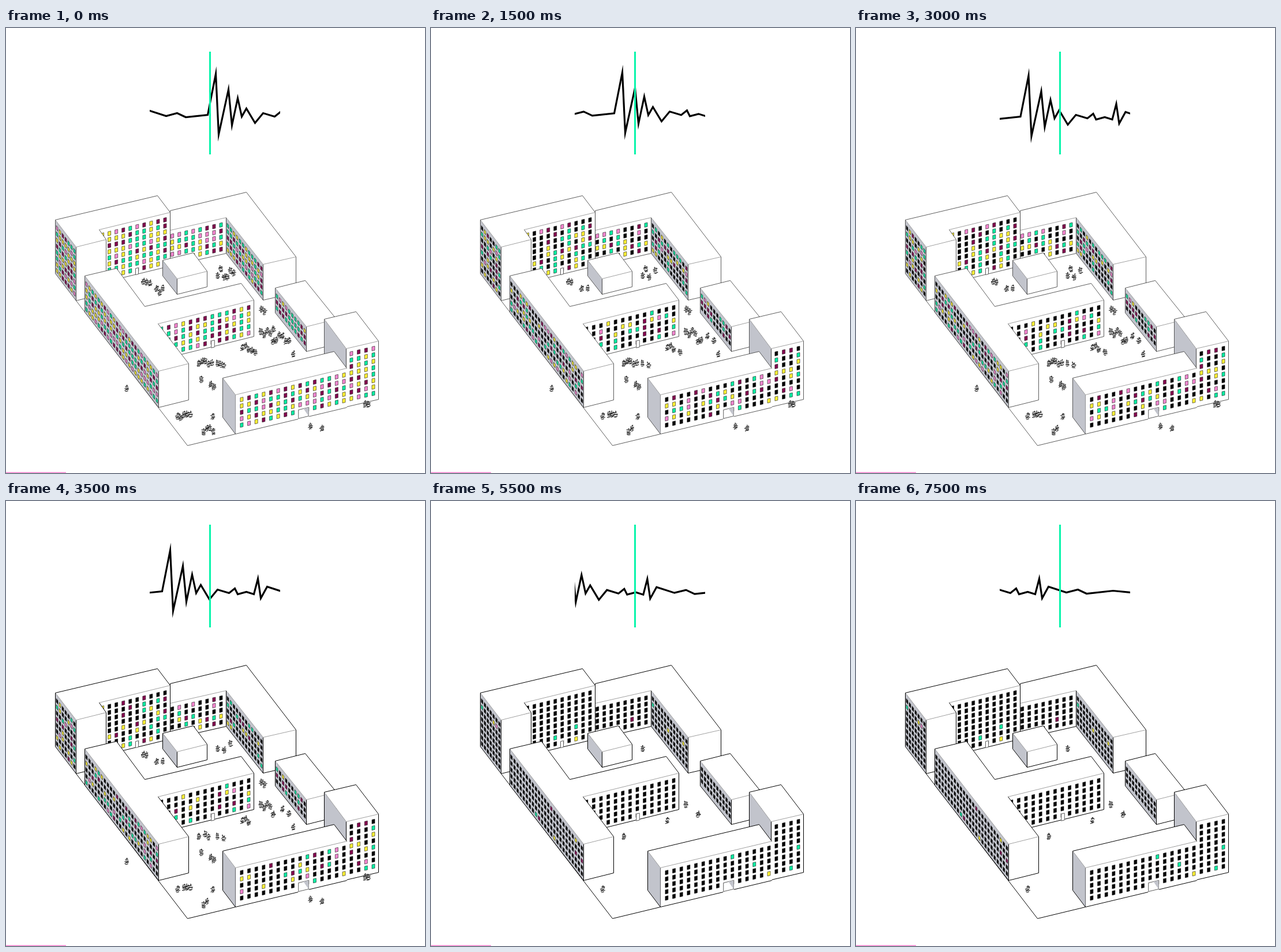
Animation of 726x771 px, one loop 8 s. Source, as an HTML page with a canvas:

```html
<!DOCTYPE html>
<html>
<head>
<meta charset="utf-8">
<style>
html, body { margin: 0; width: 100%; height: 100%; overflow: hidden; background: #fff; }
canvas { display: block; }
</style>
</head>
<body>
<canvas id="stage" width="726" height="771"></canvas>
<script>
const ctx = document.getElementById('stage').getContext('2d');
const STEP = 500, STEPS = 16;
const PHASE_STARTS = [2, 3, 7, 10]; // steps at which windows go dark and people leave
const STAYS = 9;
const SLOPE = -.243;                // fall of the front walls on screen
const WHITE = '#fff', GRAY = '#c2c4cc', GREEN = '#08f0a4', PINK = '#f887d2';

function seeded(seed) {
  return () => {
    seed = (seed + 0x6d2b79f5) | 0;
    let t = Math.imul(seed ^ (seed >>> 15), 1 | seed);
    t = (t + Math.imul(t ^ (t >>> 7), 61 | t)) ^ t;
    return ((t ^ (t >>> 14)) >>> 0) / 4294967296;
  };
}
const rnd = seeded(41);

// First entry whose limit lies above a random number.
const pick = options => {
  const n = rnd();
  return options.find(([limit]) => n < limit)[1];
};
const shape = points => new Path2D('M' + points.join(' ') + 'Z');
const line = points => new Path2D('M' + points.join(' '));

// Parallelogram with vertical sides around a centre.
function pane(x, y, w, h, slope) {
  const k = slope * w / 2, l = x - w / 2, r = x + w / 2;
  return shape([[l, y - k - h / 2], [r, y + k - h / 2], [r, y + k + h / 2], [l, y - k + h / 2]]);
}

// Wall hanging from the roof edge between two corners, left to right.
function wall([x0, y0], [x1, y1], height, pitch, joined, glazed) {
  const slope = (y1 - y0) / (x1 - x0), gray = slope > 0;
  const foot = [[x0, y0], [x0, y0 + height], [x1, y1 + height]];
  const w = { fill: gray ? GRAY : WHITE, windows: [], top: line([[x0, y0], [x1, y1]]),
    path: shape([...foot, [x1, y1]]), sides: line(joined ? foot : [...foot, [x1, y1]]) };
  if (!glazed) return w;

  const inset = gray ? 3 : joined ? 5 : 9;
  const span = x1 - x0 - 2 * inset;
  const dx = gray ? span / Math.round(span / 5.2) : pitch, dy = pitch * .875;
  const rows = Math.floor((height - 4) / dy);
  for (let x = x1 - inset; x > x0 + 2; x -= dx) for (let r = 0; r < rows; r++) {
    const y = y0 + (x - x0) * slope + 10.7 + r * dy;
    w.windows.push({
      path: pane(x, y, gray ? 2.7 : 5, gray ? 6 : 7, slope),
      color: pick([[.32, GREEN], [.6, '#fff335'], [.79, PINK], [1, '#85054f']]),
      off: pick([[.12, 1], [.48, 2], [.62, 3], [.93, 4], [1, STAYS]])
    });
  }
  return w;
}

// Extrudes a clockwise roof: edges that run leftwards face the viewer and carry walls.
function block({ roof, height, pitch = 12.05, glazed = [], joined = false }) {
  const walls = [], rims = [];
  roof.forEach((a, i) => {
    const b = roof[(i + 1) % roof.length];
    if (b[0] < a[0]) walls.push(wall(b, a, height, pitch, joined, glazed.includes(i)));
    else rims.push(line([a, b]));
  });
  return { roof: shape(roof), walls, rims };
}

const blocks = [
  { roof: [[284, 316], [416, 284], [502, 396], [445, 409], [381, 328], [284, 350]], height: 62, glazed: [3, 4] },
  { roof: [[85, 332], [262, 290], [284, 319], [161, 349], [173, 366], [121, 379]], height: 93, glazed: [2, 5] },
  { roof: [[271, 402], [324, 389], [348, 421], [296, 434]], height: 27 },
  { roof: [[136, 429], [191, 416], [240, 482], [407, 442], [429, 471], [263, 512], [316, 581], [264, 594]],
    height: 63, pitch: 12.6, glazed: [4, 7] },
  { roof: [[466, 450], [518, 437], [572, 504], [520, 517]], height: 43, glazed: [3] },
  { roof: [[551, 504], [606, 491], [645, 542], [589, 555]], height: 101, pitch: 12.7, glazed: [2] },
  { roof: [[375, 606], [568, 560], [590, 589], [397, 635]], height: 68, pitch: 12.65, glazed: [2], joined: true }
].map(block);
const ground = line([[121, 472], [314, 723], [397, 703]]);
const doors = [[226.5, 421, 5, 11], [358, 547, 5.5, 12], [515, 666.5, 17.5, 15]];

// Crowds: centre and head count. The first of each group is the last to leave.
const people = [
  [243, 440, 3], [266, 455, 3], [380, 426, 6], [445, 489, 2], [452, 525, 5], [476, 538, 6], [420, 557, 5],
  [345, 577, 5], [371, 580, 3], [338, 608, 1], [357, 619, 2], [497, 566, 1], [209, 623, 1], [308, 669, 5],
  [350, 694, 4], [358, 672, 1], [527, 690, 1], [547, 695, 1], [624, 652, 2]
].flatMap(([x, y, count]) => Array.from({ length: count }, (_, i) => ({
  path: figure(x + (i - (count - 1) / 2) * 5.5, y + (rnd() - .5) * count * 3),
  off: i ? pick([[.35, 1], [.5, 3], [1, 4]]) : count > 4 ? STAYS : 4
})));

// A hatched blob with a dot for a head.
function figure(x, y) {
  const path = new Path2D();
  path.arc(x + rnd() * 4 - 2, y - 5.5, .6, 0, 7);
  for (let dy = -4; dy <= 5; dy += 1.7) {
    const w = 4.2 * Math.sqrt(1 - dy * dy / 36) * (.6 + rnd() * .4), cx = x + rnd() * 2 - 1;
    path.moveTo(cx - w, y + dy + rnd());
    path.quadraticCurveTo(cx, y + dy + rnd() * 4 - 2, cx + w, y + dy - rnd());
  }
  return path;
}

const wave = line(['230,139 249,143 277,152 296,147 311,154 349,150 363,79 368,184 385,106 391,168 401,121',
  '408,153 416,139 431,164 445,147 465,153 475,145 480,155 495,151 508,155 515,128 520,162 531,142',
  '562,152 582,147 597,154 643,149 673,152 690,152']);
// Step, distance travelled to the left, drop.
const drift = [[0, 0, 0], [2, 23, -4], [5, 50, 0], [7, 79, 6], [9, 112, 7], [15, 198, 6]];

function driftAt(step) {
  const i = Math.max(1, drift.findIndex(key => key[0] >= step));
  const a = drift[i - 1], b = drift[i], t = (step - a[0]) / (b[0] - a[0]);
  return [1, 2].map(n => a[n] + (b[n] - a[n]) * t);
}

function stroke(path, color, width) {
  ctx.strokeStyle = color;
  ctx.lineWidth = width;
  ctx.stroke(path);
}

function fill(path, color) {
  ctx.fillStyle = color;
  ctx.fill(path);
}

function drawBlock({ roof, walls, rims }, phase, edge) {
  for (const w of walls) {
    fill(w.path, w.fill);
    for (const win of w.windows) {
      fill(win.path, phase >= win.off ? '#000' : win.color);
      stroke(win.path, '#111', .6);
    }
    edge(w.sides);
  }
  fill(roof, WHITE);
  walls.forEach(w => stroke(w.top, '#888', .8));
  rims.forEach(edge);
}

function drawDoor([x, y, w, h]) {
  fill(pane(x, y, w + 1, h + 5, SLOPE), WHITE);
  stroke(pane(x, y, w, h, SLOPE), '#333', .8);
  if (w > 10) fill(shape([[x, y - h / 2], [x + w / 2, y - h / 2 - 2], [x + w / 2, y + h / 2 - 2]]), GRAY);
}

function draw(step) {
  const phase = PHASE_STARTS.filter(start => step >= start).length;
  const bold = phase == 1 || phase > 2;
  const edge = path => stroke(path, bold ? '#000' : '#333', bold ? 1 : .8);
  ctx.fillStyle = WHITE;
  ctx.fillRect(0, 0, 726, 771);

  ctx.save();
  ctx.translate(.5, .5);
  edge(ground);
  blocks.forEach(b => drawBlock(b, phase, edge));
  doors.forEach(drawDoor);
  people.forEach(p => phase < p.off && stroke(p.path, '#000', 1));
  ctx.beginPath();
  ctx.rect(248.5, 30, 226, 200);
  ctx.clip();
  const [dx, dy] = driftAt(step);
  ctx.translate(-dx, dy);
  stroke(wave, '#000', 3.2);
  ctx.restore();

  ctx.fillStyle = '#08f5ab';
  ctx.fillRect(352, 41, 3, 178);
  ctx.fillStyle = PINK;
  ctx.fillRect(0, 769.5, 104, 1.5);
}

const start = performance.now();
let shown = -1;
function tick() {
  const step = Math.floor((performance.now() - start) / STEP) % STEPS;
  if (step !== shown) draw(shown = step);
  requestAnimationFrame(tick);
}
tick();
</script>
</body>
</html>
```
